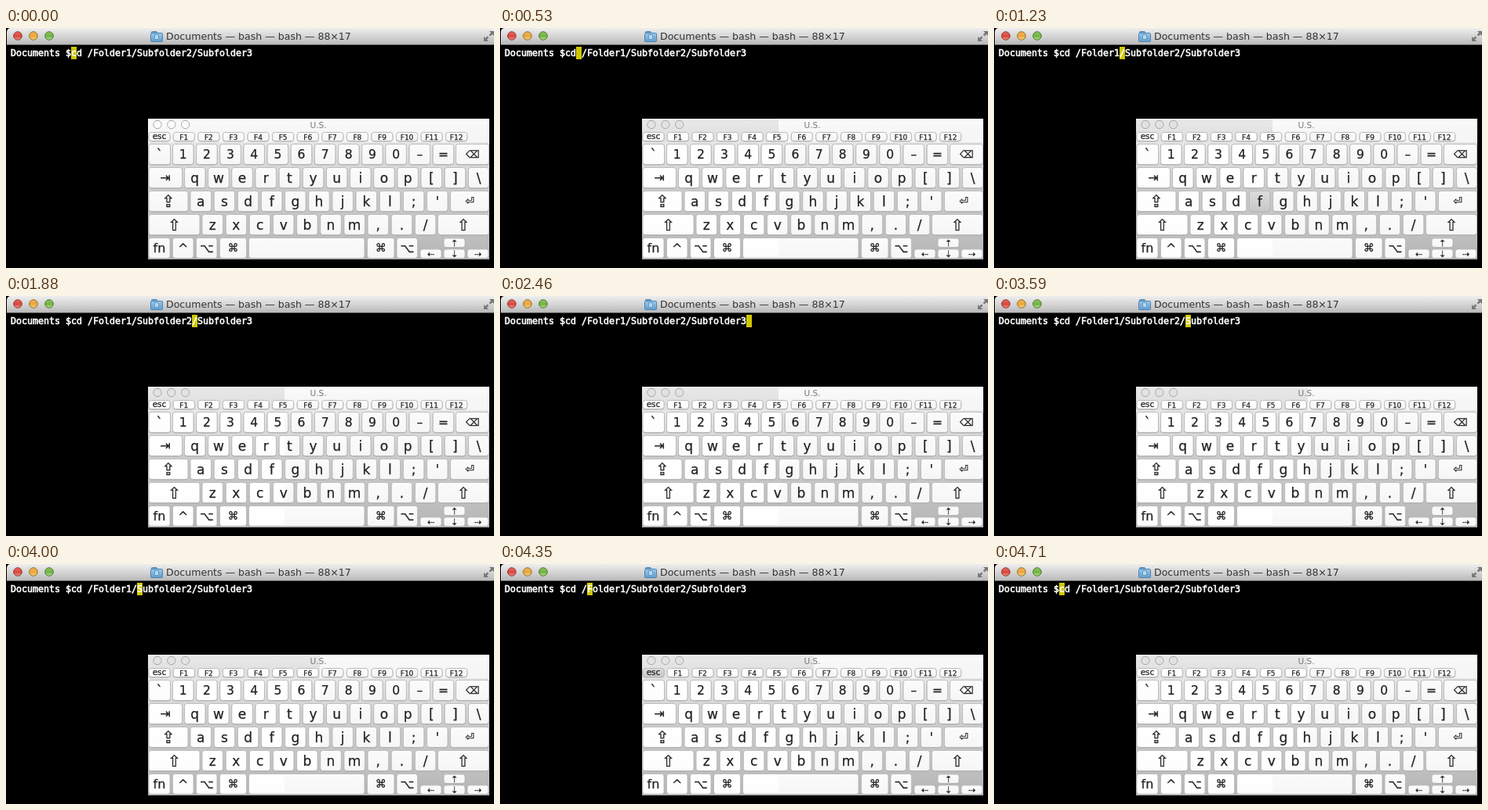
Write an HTML page with a canvas that moves like this. It is 622x307 px and loops after 5.14 s.

```html
<!DOCTYPE html>
<html lang="en">
<meta charset="utf-8">
<title>Terminal word jumps</title>
<style>
  html, body { margin: 0; width: 100%; height: 100%; overflow: hidden; background: #000; }
  canvas { display: block; }
</style>
<canvas id="stage" width="622" height="307"></canvas>
<script>
const ctx = document.getElementById('stage').getContext('2d');
const LOOP = 5140;
const SANS = '"DejaVu Sans", sans-serif';
const MONO = '"DejaVu Sans Mono", monospace';

// Key presses: key, down, up, cursor column reached on the way down
const presses = [
  ['esc', 240, 300], ['f', 410, 530, 13],
  ['esc', 820, 940], ['f', 1230, 1350, 22],
  ['esc', 1580, 1640], ['f', 1760, 1880, 33],
  ['esc', 1990, 2110], ['f', 2280, 2460, 44],
  ['esc', 2640, 2750], ['b', 3290, 3350, 34],
  ['esc', 3470, 3590], ['b', 3710, 3830, 23],
  ['esc', 3890, 4000], ['b', 4120, 4230, 15],
  ['esc', 4350, 4410], ['b', 4590, 4710, 11]
];

// Keyboard tones: at rest, and in the areas already repainted
const resting = { bar: ['#fbfbfb', '#f6f6f6'], key: ['#fbfbfb', '#f6f6f6'], dot: '#fbfbfb' };
const repainted = { bar: ['#e9e9e9', '#e2e2e2'], key: ['#ffffff', '#fdfdfd'], dot: '#e2e2e2' };
const symbolSize = { '⇧': 20, '⇪': 21, '⏎': 14, '⌫': 12.5, '⌘': 14, '⌥': 15.5, 'fn': 16, '^': 16, '⇥': 16 };

const keys = [];
const addKey = (label, x, y, w, h, size, base) => keys.push({ label, x, y, w, h, size, base });

function addBigKey(label, x, y, w, size = symbolSize[label] || 17) {
  addKey(label, x, y, w, 26, size, y + 19 + (size - 17) * 0.36);
}

function addRow(y, first, startX, chars, last, lastX, size) {
  addBigKey(first, 182, y, startX - 185);
  [...chars].forEach((c, i) => addBigKey(c, startX + i * 30.15, y, 26.5, size));
  addBigKey(last, lastX, y, 615.5 - lastX);
}

addKey('esc', 182, 133.5, 27, 11, 10.5, 142);
for (let i = 0; i < 12; i++) addKey('F' + (i + 1), 213.3 + i * 31.58, 133.5, 27, 11, 9, 142.5);
addRow(148.5, '`', 212.5, '1234567890–=', '⌫', 573.5, 15.5);
addRow(178.5, '⇥', 227.5, 'qwertyuiop[]', '\\', 589.5);
addRow(208.5, '⇪', 235, "asdfghjkl;'", '⏎', 566.5);
addRow(238.5, '⇧', 250, 'zxcvbnm,./', '⇧', 550.5);
[['fn', 182, 27], ['^', 212.5, 26.5], ['⌥', 242.5, 26.5], ['⌘', 272.5, 34], ['', 309.5, 147.5],
 ['⌘', 460.5, 34.5], ['⌥', 498, 26.5]]
  .forEach(([c, x, w]) => addBigKey(c, x, 268.5, w));
[['⇠', 528, 283], ['⇡', 558, 269], ['⇣', 558, 283], ['⇢', 588, 283]]
  .forEach(([c, x, y]) => addKey(c, x, y, 27, 11.5, 11, y + 10));

function fade(y, h, colors) {
  const g = ctx.createLinearGradient(0, y, 0, y + h);
  colors.forEach((c, i) => g.addColorStop(i / (colors.length - 1), c));
  return g;
}

// A thin outline of the same colour gives slightly heavier letters
function text(str, x, y, font, color, align = 'left', weight = 0) {
  ctx.font = font;
  ctx.fillStyle = ctx.strokeStyle = color;
  ctx.textAlign = align;
  ctx.fillText(str, x, y);
  if (!weight) return;
  ctx.lineWidth = weight;
  ctx.strokeText(str, x, y);
}

function shape(path, fill, stroke) {
  ctx.fillStyle = fill;
  ctx.fill(path);
  ctx.lineWidth = 1;
  ctx.strokeStyle = stroke;
  ctx.stroke(path);
}

function circle(x, y, r, fill, stroke) {
  const p = new Path2D();
  p.arc(x, y, r, 0, Math.PI * 2);
  shape(p, fill, stroke);
}

function box(x, y, w, h, r, fill, stroke) {
  const p = new Path2D();
  p.roundRect(x, y, w, h, r);
  shape(p, fill, stroke);
}

function drawWindow(col) {
  ctx.fillStyle = '#000';
  ctx.fillRect(0, 0, 622, 307);
  ctx.fillStyle = fade(0, 22, ['#eeeeee', '#d4d4d4', '#b6b6b6']);
  ctx.beginPath();
  ctx.roundRect(1, 0, 625, 21.5, [5, 0, 0, 0]);
  ctx.fill();

  [['#e8675e', '#d8463d', '#f3a39a', '#8f3b36'], ['#efb055', '#e9a83c', '#f8dc96', '#96702f'],
   ['#8cc35a', '#72b344', '#c3e69a', '#4d7a37']]
    .forEach(([top, mid, low, edge], i) => circle(15 + i * 20, 10, 5.3, fade(5, 11, [top, mid, low]), edge));

  box(185.5, 4.5, 7, 4, 1, '#6ea7d3', '#4d83b0');
  box(184.5, 6.5, 15, 11, 1, fade(6, 11, ['#9bcaeb', '#659fce']), '#4d83b0');
  box(189.5, 8.5, 5, 6, 0.5, '#b4d8f0', '#6298c2');
  text('Documents — bash — bash — 88×17', 204, 15, '12.55px ' + SANS, '#333');

  ctx.fillStyle = '#777';
  ctx.fill(new Path2D('M616 4h6v6l-2-2-2.6 2.6-1.8-1.8 2.6-2.6zM609 11l2 2 2.6-2.6 1.8 1.8-2.6 2.6 2.2 2.2h-6z'));

  ctx.fillStyle = '#cfc800';
  ctx.fillRect(6 + col * 7, 24, 7, 16);
  text('Documents $cd /Folder1/Subfolder2/Subfolder3', 6, 36, '11.63px ' + MONO, '#fff', 'left', 0.6);
}

function drawKeyboard(tone, pressed) {
  ctx.fillStyle = fade(116, 180, ['#f4f4f4', '#e0e0e0', '#cccccc', '#c4c4c4', '#b4b4b4']);
  ctx.fillRect(181, 116, 435, 180);
  ctx.fillStyle = fade(116, 17, tone.bar);
  ctx.fillRect(181, 116, 435, 30);
  for (let i = 0; i < 3; i++) circle(193 + i * 17.8, 123.5, 5.2, tone.dot, '#a8a8a8');
  text('U.S.', 398, 128, '10.5px ' + SANS, '#777', 'center');

  for (const k of keys) {
    const down = k.label === pressed;
    const fill = fade(k.y, k.h, down ? ['#dcdcdc', '#d2d2d2', '#c8c8c8'] : tone.key);
    box(k.x, k.y + 0.5, k.w, k.h, 3, '#a4a4a4', '#a8a8a8');
    box(k.x, k.y, k.w, k.h, 3, fill, '#bcbcbc');
    text(k.label, k.x + k.w / 2, k.base, k.size + 'px ' + SANS, '#222', 'center', 0.25);
  }
}

function draw(t) {
  let col = 11, pressed = null;
  for (const [key, down, up, to] of presses) {
    if (t < down) break;
    if (to) col = to;
    pressed = t < up ? key : null;
  }
  drawWindow(col);
  drawKeyboard(resting, pressed);
  if (t < 240) return;
  ctx.save();
  ctx.beginPath();
  ctx.rect(181, 116, 174, 176);
  if (t >= 3290) ctx.rect(355, 116, 45, 148);
  ctx.clip();
  drawKeyboard(repainted, pressed);
  ctx.restore();
}

const start = performance.now();
function tick() {
  draw((performance.now() - start) % LOOP);
  requestAnimationFrame(tick);
}
tick();
</script>
</html>
```
